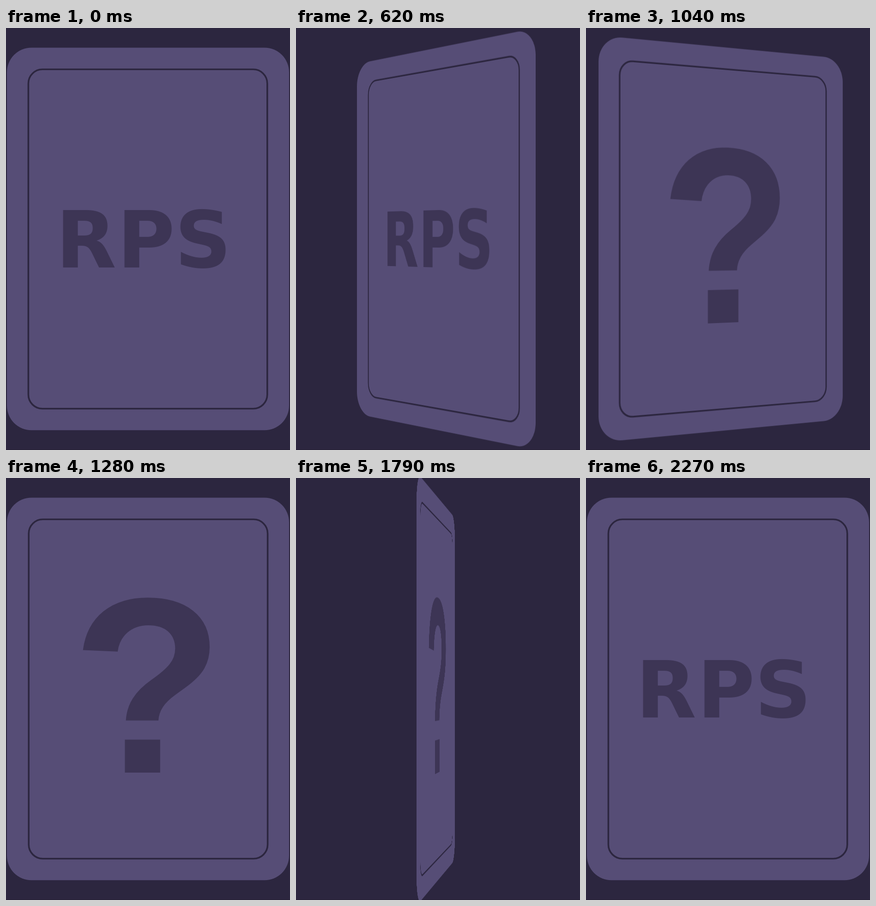
An HTML page that plays this animation: 615 px wide and 911 px high, repeating every 2.6 s.

```html
<!DOCTYPE html>
<html lang="en">
<head>
<meta charset="utf-8">
<title>Flipping card</title>
<style>
  html, body { margin: 0; width: 100%; height: 100%; overflow: hidden; background: #2c263f; }
  .stage {
    position: absolute; left: 0; top: 0; width: 615px; height: 911px; overflow: hidden;
    perspective: 2560px; perspective-origin: 307.5px 455.5px;
    box-shadow: inset 0 -1px #241f34;
  }
  .card, .face { position: absolute; inset: 0; transform-origin: 307.5px 455.5px; }
  .card { transform-style: preserve-3d; }
  .face { backface-visibility: hidden; }
  .back { transform: rotateY(180deg); }
  svg { display: block; overflow: visible; }
  .base { fill: #564d76; }
  .line { fill: none; stroke: #2c263f; stroke-width: 3.6px; }
  text { fill: #3d3555; font-weight: bold; }
  .name { font-family: Verdana, "DejaVu Sans", sans-serif; font-size: 170px; }
  .mark { font-family: Arial, "Liberation Sans", sans-serif; font-size: 541px; text-anchor: middle; }
</style>
</head>
<body>
<div class="stage">
  <div class="card" id="card">
    <div class="face">
      <svg width="615" height="911">
        <rect class="base" x="2" y="42.5" width="611" height="825.7" rx="53"/>
        <rect class="line" x="48.4" y="89.3" width="517.4" height="732.5" rx="30.5"/>
        <text class="name" x="108 241 365.5" y="517.3">RPS</text>
      </svg>
    </div>
    <div class="face back">
      <svg width="615" height="911">
        <rect class="base" x="2" y="42.5" width="611" height="825.7" rx="53"/>
        <rect class="line" x="49.2" y="89.3" width="517.4" height="732.5" rx="30.5"/>
        <text class="mark" x="307" y="636">?</text>
      </svg>
    </div>
  </div>
</div>
<script>
  const LOOP = 2600, STEP = 30;
  const card = document.getElementById('card');

  // Each flip: [time in ms, degrees turned]
  const open = [[500, 13], [620, 51.1], [860, 113.9], [1010, 144.3], [1280, 180]];
  const close = [[1550, 4], [1670, 38.5], [1790, 82.3], [2030, 151.3], [2060, 157.4], [2270, 180]];

  const rate = (a, b) => (b[1] - a[1]) / (b[0] - a[0]);

  function slope(keys, i) {
    const [a, b, c] = [keys[i - 1], keys[i], keys[i + 1]];
    if (!a) return rate(b, c);
    if (!c) return rate(a, b) / 2;
    const left = b[0] - a[0], right = c[0] - b[0];
    return (rate(a, b) * right + rate(b, c) * left) / (left + right);
  }

  // Smooth Hermite curve through the keys
  function turn(keys, time) {
    const start = keys[0][0], last = keys.length - 1;
    if (time < start) return 0;
    const t = start + Math.floor((time - start) / STEP) * STEP;
    if (t >= keys[last][0]) return 180;
    const i = keys.findIndex(k => k[0] > t) - 1;
    const [t0, a] = keys[i], [t1, b] = keys[i + 1];
    const h = t1 - t0, u = (t - t0) / h, v = 1 - u;
    return a * v * v * (1 + 2 * u) + b * u * u * (3 - 2 * u)
      + h * u * v * (slope(keys, i) * v - slope(keys, i + 1) * u);
  }

  function draw() {
    const time = performance.now() % LOOP;
    const angle = turn(close, time) - turn(open, time);
    card.style.transform = `rotateY(${angle}deg)`;
    requestAnimationFrame(draw);
  }
  draw();
</script>
</body>
</html>
```
